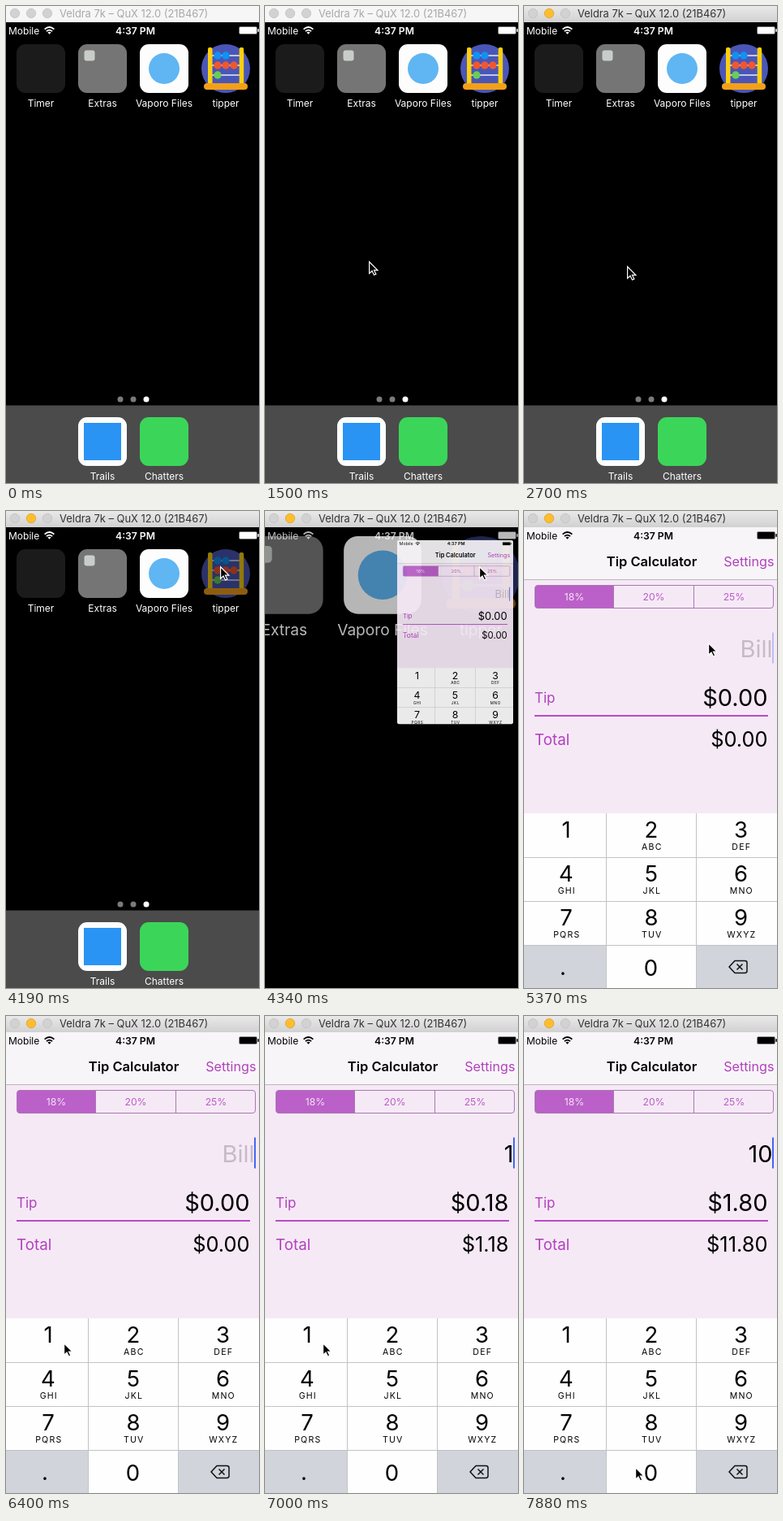
Write an HTML page that moves like this. It is 312 px wide and 587 px high and loops after 8000 ms.

```html
<!DOCTYPE html>
<html lang="en">
<head>
<meta charset="utf-8">
<title>Tip calculator demo</title>
<style>
  html, body { margin: 0; width: 100%; height: 100%; overflow: hidden; background: #000; }
  svg { display: block; width: 312px; height: 587px; }
  text { font-family: Inter, "Open Sans", sans-serif; }
  .mid { text-anchor: middle; }
  .end { text-anchor: end; }
</style>
</head>
<body>
<svg id="stage" viewBox="0 0 312 587">
  <defs>
    <linearGradient id="bar" x1="0" y1="0" x2="0" y2="1">
      <stop offset="0" stop-color="#e9e9e9"/><stop offset="1" stop-color="#d1d1d1"/>
    </linearGradient>
    <clipPath id="appClip"><rect id="appBox" x="-3" y="20" width="320" height="567"/></clipPath>
  </defs>
  <rect width="312" height="587"/>
  <g id="home"></g>
  <g id="homeStatus"></g>
  <g id="app" clip-path="url(#appClip)"></g>
  <g id="titleBar"></g>
  <path id="cursor" d="M.6.8V15.2L4 12 6.5 17 8.9 15.9 6.5 11.2H10.9Z" stroke="#fff" stroke-width="1.2"/>
</svg>
<script>
const LOOP = 8000;
const ACCENT = '#b041bd';
const KEY_GREY = '#d1d4db';
const $ = id => document.getElementById(id);

// Markup helpers; text is placed by the middle of its capitals.
const rect = (x, y, w, h, fill, extra = '') =>
  `<rect x="${x}" y="${y}" width="${w}" height="${h}" fill="${fill}" ${extra}/>`;
const circle = (x, y, r, fill, extra = '') =>
  `<circle cx="${x}" cy="${y}" r="${r}" fill="${fill}" ${extra}/>`;
const label = (str, x, y, size, fill, extra = '') =>
  `<text x="${x}" y="${(y + size * .364).toFixed(2)}" font-size="${size}" fill="${fill}" ${extra}>${str}</text>`;
const MID = 'class="mid"', END = 'class="end"';

function status(color) {
  return label('Mobile', 3, 30.5, 12, color) +
    `<g fill="none" stroke="${color}" stroke-width="1.8">
      <path d="M47.6 28.6Q53.5 23.4 59.4 28.6"/><path d="M49.9 31.2Q53.5 28 57.1 31.2"/></g>` +
    `<path d="M51.4 32.6Q53.5 30.9 55.6 32.6L53.5 34.8Z" fill="${color}"/>` +
    label('4:37 PM', 159.5, 30.5, 12.2, color, MID + ' font-weight="600"') +
    rect(287.5, 25.5, 22, 9, 'none', `rx="1.5" stroke="${color}" stroke-width=".8" stroke-opacity=".5"`) +
    rect(288, 26, 21, 8, color, 'rx=".8"') +
    rect(310.3, 28, 1.5, 4, color, 'rx=".7"');
}

function abacus() {
  const bead = (col, row, fill) => circle(261 + col * 10, 61 + row * 12, 4.7, fill);
  return circle(271, 77, 30, '#4a56b7') +
    [61, 73, 85].map(y => rect(254, y - .8, 35, 1.6, '#dfe3ee')).join('') +
    bead(0, 0, '#1191f2') + bead(1, 0, '#1191f2') +
    [0, 1, 2].map(c => bead(c, 1, '#f2562c')).join('') +
    bead(0, 2, '#67cf52') +
    rect(249, 51, 5.5, 46, '#fcd00c', 'rx="2"') + rect(287.7, 51, 5.5, 46, '#fcd00c', 'rx="2"') +
    rect(244, 95, 54, 8, '#f3a019', 'rx="4"');
}

function homeScreen() {
  const tile = (x, y, fill, name) => rect(x, y, 60, 60, fill, 'rx="11"') +
    label(name, x + 30, y + 72.3, 12, '#fff', MID);
  return tile(13, 47, '#1b1b1b', 'Timer') +
    tile(89, 47, '#757575', 'Extras') +
    rect(96.5, 54.5, 13, 13, '#c9cdca', 'rx="3"') +
    tile(165, 47, '#fdfdfd', 'Vaporo Files') +
    circle(195, 77, 19, '#5fb6f3') +
    `<g id="tipper">${abacus()}</g>` +
    label('tipper', 271, 119.3, 12, '#fff', MID) +
    circle(141, 484, 3.5, '#7b7b7b') + circle(157, 484, 3.5, '#7b7b7b') + circle(173, 484, 3.5, '#fff') +
    rect(0, 491.5, 312, 95.5, '#4b4b4b') +
    tile(89, 506, '#fdfdfd', 'Trails') +
    rect(96, 513, 46, 46, '#2a94f4') +
    tile(165, 506, '#3bd659', 'Chatters');
}

function keypad() {
  const letters = ['', 'ABC', 'DEF', 'GHI', 'JKL', 'MNO', 'PQRS', 'TUV', 'WXYZ'];
  const centers = [52, 157, 267.5];
  let out = rect(-3, 372, 320, 215, '#fefefe') +
    rect(-3, 534, 104, 53, KEY_GREY) + rect(212, 534, 105, 53, KEY_GREY) +
    rect(-3, 372, 104, 54, KEY_GREY, 'id="key1"') + rect(101, 534, 111, 53, KEY_GREY, 'id="key0"');
  letters.forEach((str, i) => {
    const x = centers[i % 3], top = 372 + 54 * Math.floor(i / 3);
    out += label(i + 1, x, top + 20, 27.5, '#000', MID) +
      label(str, x + .8, top + 41.3, 10.6, '#000', MID + ' letter-spacing="1.2"');
  });
  out += label('.', 48, 561, 27.5, '#000', MID) + label('0', 156.5, 561.5, 27.5, '#000', MID);
  for (const y of [426, 480, 534]) out += rect(-3, y, 320, 1, '#c3c3c6');
  for (const x of [101, 212]) out += rect(x, 372, 1, 215, '#c3c3c6');
  return out + `<g fill="none" stroke="#111" stroke-width="1.5" stroke-linejoin="round">
    <path d="M253 561L260 553.6H272.5Q275 553.6 275 556V566Q275 568.4 272.5 568.4H260Z"/>
    <path d="M262.5 557.5L269.5 564.5M269.5 557.5L262.5 564.5"/></g>`;
}

function appScreen() {
  return rect(-3, 20, 320, 567, '#f6e9f6') +
    rect(-3, 20, 320, 64, '#f8f5f8') + rect(-3, 84, 320, 1, '#bdb6bd') +
    status('#000') +
    label('Tip Calculator', 157.5, 62, 16.5, '#000', MID + ' font-weight="600"') +
    label('Settings', 308.5, 62, 16.2, ACCENT, END) +
    `<path d="M110.5 91.5H17A3.5 3.5 0 0 0 13.5 95V116A3.5 3.5 0 0 0 17 119.5H110.5Z" fill="#ba60c8"/>` +
    rect(13.5, 91.5, 294, 28, 'none', 'rx="3.5" stroke="#a878b0"') +
    rect(110, 91.5, 1, 28, '#a878b0') + rect(209, 91.5, 1, 28, '#a878b0') +
    label('18%', 62, 105.5, 12.2, '#f5e2f7', MID) +
    label('20%', 160, 105.5, 12.2, '#b75cc4', MID) +
    label('25%', 259, 105.5, 12.2, '#b75cc4', MID) +
    label('', 306.5, 169, 29, '#000', END + ' id="bill"') +
    rect(306, 149.5, 2, 38, '#4068f0', 'id="caret"') +
    label('Tip', 13, 229.5, 17, ACCENT) +
    label('', 300.5, 229, 29, '#000', END + ' id="tip"') +
    rect(13, 251, 288, 2, '#b74cc5') +
    label('Total', 13, 281, 18.8, ACCENT) +
    label('', 300.5, 281, 25.4, '#000', END + ' id="total"') +
    keypad();
}

function titleBar() {
  return rect(0, 0, 312, 20, '#f6f6f6', 'id="barFill"') +
    [11, 31, 51].map((x, i) => circle(x, 9, 5.7, '#d2d2d2', `stroke="#c2c2c2" stroke-width=".8" id="light${i}"`)).join('') +
    label('Veldra 7k – QuX 12.0 (21B467)', 66, 9.5, 12.9, '#a8a8a8', 'id="barText"');
}

$('home').innerHTML = homeScreen();
$('homeStatus').innerHTML = status('#fff');
$('app').innerHTML = appScreen();
$('titleBar').innerHTML = titleBar();

// Step tables: time first, then values held until the next row.
const POINTER = [
  [0, -50, -50], [1200, 139, 364], [1350, 133, 338], [1500, 128, 314], [1650, 127, 320],
  [3000, 146, 282], [3150, 190, 198], [3300, 235, 118], [3450, 260, 76], [3590, 264, 68],
  [5370, 227, 162], [5520, 126, 397],
  [5820, 92, 404], [5970, 72, 406], [6120, 70, 404], [6260, 71, 402],
  [7140, 78, 425], [7290, 104, 485], [7440, 128, 535], [7590, 137, 555]
];
const ZOOM = [[0, 0], [4340, .32], [4490, .86], [4640, .98], [4780, 1]];
const CARET = [[0, 1], [5370, .32], [5520, 0], [5820, .4], [5970, 1], [6410, .32], [6550, 0], [6850, .5], [7000, 1]];
const BILL = [[0, 0], [7000, 1], [7880, 10]];

const at = (table, t) => table.findLast(row => row[0] <= t);
const show = (id, on) => $(id).setAttribute('visibility', on ? 'visible' : 'hidden');
const set = (id, name, value) => $(id).setAttribute(name, value);
const money = n => '$' + n.toFixed(2);

function drawZoom(p) {
  const scale = (60 + 260 * p) / 320;
  const left = 241 - 244 * p, top = 20 + 27 * (1 - p) ** 1.4;
  show('app', p > 0);
  set('app', 'transform', `translate(${left} ${top}) scale(${scale}) translate(3 -20)`);
  set('app', 'opacity', Math.min(1, .6 + p));
  set('appBox', 'height', Math.min(567, (60 + 520 * p) / scale));
  set('appBox', 'rx', p < 1 ? 6 : 0);
  set('home', 'transform', `translate(279 74) scale(${1 + 1.86 * p}) translate(-279 -74)`);
  set('home', 'opacity', 1 - .87 * p);
  set('homeStatus', 'opacity', 1 - .87 * p);
}

function draw(t) {
  const active = t >= 2700;
  set('barFill', 'fill', active ? 'url(#bar)' : '#f6f6f6');
  set('barText', 'fill', active ? '#333' : '#a8a8a8');
  set('light1', 'fill', active ? '#fdbd2f' : '#d2d2d2');
  set('light1', 'stroke', active ? '#e0a32a' : '#c2c2c2');

  const [, x, y] = at(POINTER, t);
  set('cursor', 'transform', `translate(${x} ${y})`);
  $('tipper').style.filter = t >= 4190 ? 'brightness(.58)' : 'none';
  drawZoom(at(ZOOM, t)[1]);

  const bill = at(BILL, t)[1];
  $('bill').textContent = bill || 'Bill';
  set('bill', 'fill', bill ? '#000' : '#c6bac8');
  $('tip').textContent = money(bill * .18);
  $('total').textContent = money(bill * 1.18);
  set('caret', 'opacity', at(CARET, t)[1]);
  set('key1', 'opacity', t >= 6850 && t < 7000 ? 1 : 0);
  set('key0', 'opacity', t >= 7740 && t < 7880 ? 1 : 0);
}

const start = performance.now();
function tick() {
  draw((performance.now() - start) % LOOP);
  requestAnimationFrame(tick);
}
tick();
</script>
</body>
</html>
```
